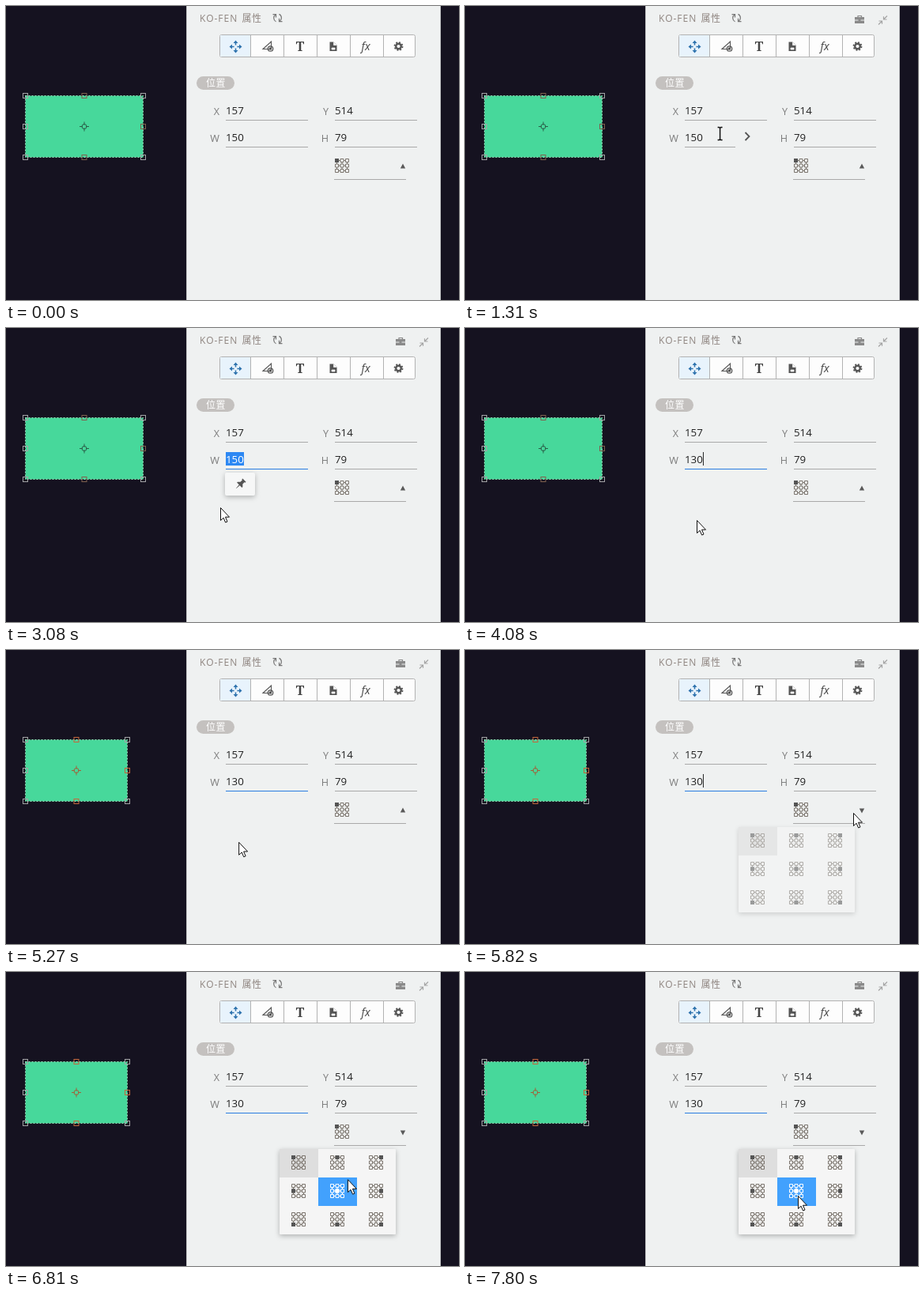
An HTML page that plays this animation: 573 by 372 pixels, repeating every 8000 ms.

```html
<!DOCTYPE html>
<html lang="zh">
<head>
<meta charset="utf-8">
<style>
html, body { margin: 0; width: 100%; height: 100%; overflow: hidden; background: #151220; }
svg { display: block; }
text { font: 13.3px "Open Sans", "Noto Sans", "Noto Sans CJK SC", sans-serif; fill: #222; }
.label { font-size: 12.6px; fill: #7c7c7c; text-anchor: end; }
.title { font-size: 12px; fill: #8f8580; letter-spacing: 1px; }
.cjk { font-family: "Noto Sans CJK SC", "Noto Sans CJK", sans-serif; font-size: 12px; letter-spacing: .4px; }
.line { stroke: #a9a9a9; }
.float { filter: drop-shadow(0 2px 3px #0004); }
.grey { stroke: #555; fill: none; }
</style>
</head>
<body>
<svg id="stage" width="573" height="372" viewBox="0 0 573 372"></svg>
<script>
const LOOP = 8000, TICK = 110, BLINK = 530;
const ENTER = 450, FOCUS = 2430, TYPE = 3410, COMMIT = 4630, OPEN = 5720;

// Pointer moves: start, end, x, y
const MOVES = [
  [ENTER, 1190, 322, 161], [1320, 1600, 345, 314], [1600, 1980, 314, 160],
  [FOCUS, 2750, 244, 168], [2750, 3080, 271, 227], [3300, 3740, 274, 240],
  [3850, 4070, 293, 243], [5270, OPEN, 491, 206], [6050, 6380, 442, 256],
  [6380, 7030, 429, 264], [7140, 7480, 421, 283]
];

const ramp = (t, a, b) => Math.max(0, Math.min(1, (t - a) / (b - a)));
const ease = p => p * p * (3 - 2 * p);

function pointerAt(t) {
  let x = 400, y = 360;
  for (const [start, end, toX, toY] of MOVES) {
    const p = ease(ramp(t, start, end));
    x += (toX - x) * p;
    y += (toY - y) * p;
  }
  return [x, y];
}

// Each edit or click restarts the blink
function caretOn(t) {
  const start = [TYPE, 3740, COMMIT, OPEN + 4 * TICK].findLast(s => s <= t);
  return start !== undefined && (t - start) % (2 * BLINK) < BLINK;
}

const text = (x, y, s, cls = '') => `<text x="${x}" y="${y}" class="${cls}">${s}</text>`;
const rule = (x1, x2, y) => `<path class="line" d="M${x1} ${y}H${x2}"/>`;
const rect = (x, y, w, h, attrs) => `<rect x="${x}" y="${y}" width="${w}" height="${h}" ${attrs}/>`;
const nine = f => Array.from({ length: 9 }, (_, i) => f(i, i % 3, i / 3 | 0)).join('');

// Nine linked squares with one filled
function anchorGrid(x, y, on, color = '#7b746d', fill = '#555') {
  const d = nine((i, c, r) => {
    const px = x + c * 6.5 + .5, py = y + r * 6.5 + .5;
    return `M${px} ${py}h4v4h-4z` + (c < 2 ? `M${px + 4} ${py + 2}h2.5` : '') +
      (r < 2 ? `M${px + 2} ${py + 4}v2.5` : '');
  });
  return `<path d="${d}" fill="none" stroke="${color}"/>` +
    rect(x + on % 3 * 6.5, y + (on / 3 | 0) * 6.5, 5, 5, `fill="${fill}"`);
}

function selection(w, accent, cross) {
  const x = 24.5 + w / 2, y = 152.5;
  const outline = rect(24.5, 113.5, w, 78, 'fill="none" stroke="#1c4a36"') +
    rect(24.5, 113.5, w, 78, 'fill="none" stroke="#96d9bb" stroke-dasharray="2"');
  const handles = nine((i, c, r) => i === 4 ? '' :
    rect(21.5 + c * w / 2, 110.5 + r * 39, 6, 6, `fill="none" stroke="${i % 2 && i > 0 && c ? accent : '#a3a3a6'}"`));
  return outline + handles + `<g fill="none" stroke="${cross}"><circle cx="${x}" cy="${y}" r="3"/>
    <path d="M${x - 6} ${y}h4m4 0h4M${x} ${y - 6}v4m0 4v4"/></g>`;
}

function toolbar() {
  let dividers = '', arrows = '';
  for (let x = 309.5; x < 500; x += 42) dividers += `M${x} 37V65`;
  for (let a = 0; a < 360; a += 90)
    arrows += `<path transform="rotate(${a} 290.5 51.5)" d="M290.5 43.5l3 3.5h-6zM289.7 46h1.6v3.6h-1.6z"/>`;
  return rect(270.5, 36.5, 247, 28, 'rx="2" fill="#fdfdfd" stroke="#b2b2b2"') +
    rect(271, 37, 38, 27, 'fill="#e8f3fc"') +
    `<path d="${dividers}" stroke="#b2b2b2"/>
    <g fill="#2e73ae">${arrows}</g>
    <path class="grey" stroke-width="1.1" d="M325 54.5L335.5 45V54.5z"/>
    <circle cx="334.5" cy="54" r="3.2" fill="#fdfdfd" class="grey" stroke-width="1.3"/>
    <path d="M333 52.5h3v3h-3z" fill="#555"/>
    <text x="372" y="57" text-anchor="middle" style="font:700 16px 'Noto Serif',serif;fill:#444">T</text>
    <path d="M409.5 45.5h5l4 4v7.5h-9z" fill="#555"/>
    <path d="M414.5 45.5v4h4M412 53h4v2h-4z" fill="#fdfdfd" stroke="#fdfdfd" stroke-width=".7"/>
    <text x="449.5" y="56" style="font:italic 14px 'Open Sans',sans-serif;fill:#444">fx</text>
    <circle cx="496.5" cy="51" r="3.3" class="grey" stroke-width="2.4"/>
    <circle cx="496.5" cy="51" r="5" class="grey" stroke-width="1.8" stroke-dasharray="1.96"/>`;
}

const menu = () =>
  rect(346, 224, 147, 108, 'rx="1" fill="#f5f5f5" class="float"') +
  rect(346, 224, 49, 36, 'fill="#dedede"') +
  nine((i, c, r) => anchorGrid(361 + c * 49, 232 + r * 36, i)) +
  `<g id="hover">${rect(395, 260, 49, 36, 'fill="#42a1fd"')}${anchorGrid(410, 268, 4, '#fff', '#fff')}</g>`;

stage.innerHTML = `
  <rect id="shape" x="25" y="113" height="79" fill="#47d89b"/>
  <g id="frame"></g>
  ${rect(228.5, -1, 321, 374, 'fill="#eff1f1" stroke="#c2c3c5"')}
  ${text(245, 20, 'KO-FEN', 'title')}${text(298.5, 20, '属性', 'title cjk')}
  <g fill="none" stroke="#777" stroke-width="1.2">
    <path d="M341.5 19.7A5 5 0 0 1 341 11M345.5 10.4A5 5 0 0 1 346 19.2"/>
    <path d="M337.5 10.7H341.5V14.5M349.5 19.6H345.5V15.8"/>
  </g>
  <g id="tools">
    <path d="M493 14h12v8h-12z" fill="#8a8a8a"/>
    <path d="M497 14v-1.5h4.5v1.5" fill="none" stroke="#8a8a8a" stroke-width="1.2"/>
    <path d="M493 18h4.5m3 0h4.5" stroke="#eff1f1"/>
    <path d="M534 12.5L529.5 17M529.5 13.2V17H533.5M523 23.5L527.5 19M523.5 19H527.5V22.8" fill="none" stroke="#a5a5a5" stroke-width="1.2"/>
  </g>
  ${toolbar()}
  ${rect(241, 89, 48, 17, 'rx="8.5" fill="#c4c1bf"')}
  <text x="253" y="102" class="cjk" style="fill:#fff">位置</text>
  ${text(270, 138, 'X', 'label')}${text(408, 138, 'Y', 'label')}
  ${text(270, 172, 'W', 'label')}${text(408, 172, 'H', 'label')}
  ${text(278, 137, '157')}${text(416, 137, '514')}${text(416, 171, '79')}
  ${rule(278, 382, 144.5)}${rule(416, 520, 144.5)}${rule(416, 520, 178.5)}${rule(415, 506, 219.5)}
  <path id="widthLine"/>
  <path id="chevron" fill="none" stroke="#555" stroke-width="1.8"/>
  <rect id="mark" y="157" height="17" fill="#2d88f3"/>
  <text id="width" x="278" y="171"></text>
  <path id="caret" stroke="#222"/>
  ${anchorGrid(416, 193, 0)}
  <path id="toggle" fill="#5a5a5a"/>
  <g id="pin">
    ${rect(277, 183, 38, 29, 'rx="2" fill="#f6f7f7" class="float"')}
    <g transform="translate(296.5 197.5) rotate(45)" fill="#555">
      <path d="M-3-7h6v1.5h-1v3.5l2.5 2.5v1.3h-9v-1.3l2.5-2.5v-3.5h-1zM-.6 1.8h1.2L.2 7.5h-.4z"/>
    </g>
  </g>
  <g id="menu">${menu()}</g>
  <path id="arrow" d="M.5 .5V16.5L4.1 13.2 6.6 19 9 18 6.5 12.2H11.5z" fill="#fff" stroke="#111"/>
  <path id="beam" d="M-3-8H-1L0-7 1-8H3M0-7V7M-3 8H-1L0 7 1 8H3" fill="none" stroke="#111" stroke-width="1.5"/>`;

const el = id => document.getElementById(id);
const set = (id, attrs) => { for (const k in attrs) el(id).setAttribute(k, attrs[k]); };
const show = (id, on) => set(id, { opacity: +on });

function draw(now) {
  const t = Math.floor((now % LOOP + 20) / TICK) * TICK + 10;
  const [x, y] = pointerAt(t);
  const focused = t >= FOCUS;

  set('shape', { width: t < 4940 ? 149 : 129 });
  el('frame').innerHTML = t < COMMIT + TICK
    ? selection(149, '#80604e', '#2a5e48') : selection(129, '#c4663c', '#a0623a');
  show('tools', t >= ENTER + TICK);

  // Hovering the field shortens its line to make room for the chevron
  const near = t < ENTER || focused ? 0 : 1 - ramp(y, 168, 200);
  const end = 382 - 40 * near;
  set('widthLine', { d: `M278 178.5H${end}`, stroke: focused ? '#2a7de0' : '#a9a9a9' });
  set('chevron', { d: `M${end + 12.5} 160l5 5-5 5`, opacity: near });

  const typed = Math.floor((t - TYPE) / (1.5 * TICK)) + 1;
  const value = t < TYPE ? '150' : '130'.slice(0, typed);
  const selected = t < TYPE ? 23 * ramp(t, FOCUS, 2750) : 0;
  el('width').textContent = value;
  el('width').style.fill = selected > 15 ? '#fff' : '';
  set('mark', { x: 301 - selected, width: selected });
  set('caret', { d: `M${278.5 + value.length * 7.65} 157v17` });
  show('caret', caretOn(t));
  show('pin', t < 3180 && ramp(t, FOCUS, 2640));

  set('toggle', { d: t >= OPEN + TICK ? 'M498.8 200.5h6.4l-3.2 6z' : 'M498.8 205.5h6.4l-3.2-6z' });
  show('menu', ramp(t, OPEN, OPEN + 2 * TICK));
  show('hover', t > 6400 && y > 257);

  const beam = near > .5 || (focused && t < 2800);
  set('arrow', { transform: `translate(${x} ${y})` });
  set('beam', { transform: `translate(${x + .5} ${y})` });
  show('arrow', t >= ENTER && !beam);
  show('beam', t >= ENTER && beam);
}

const start = performance.now();
function tick() {
  draw(performance.now() - start);
  requestAnimationFrame(tick);
}
tick();
</script>
</body>
</html>
```
